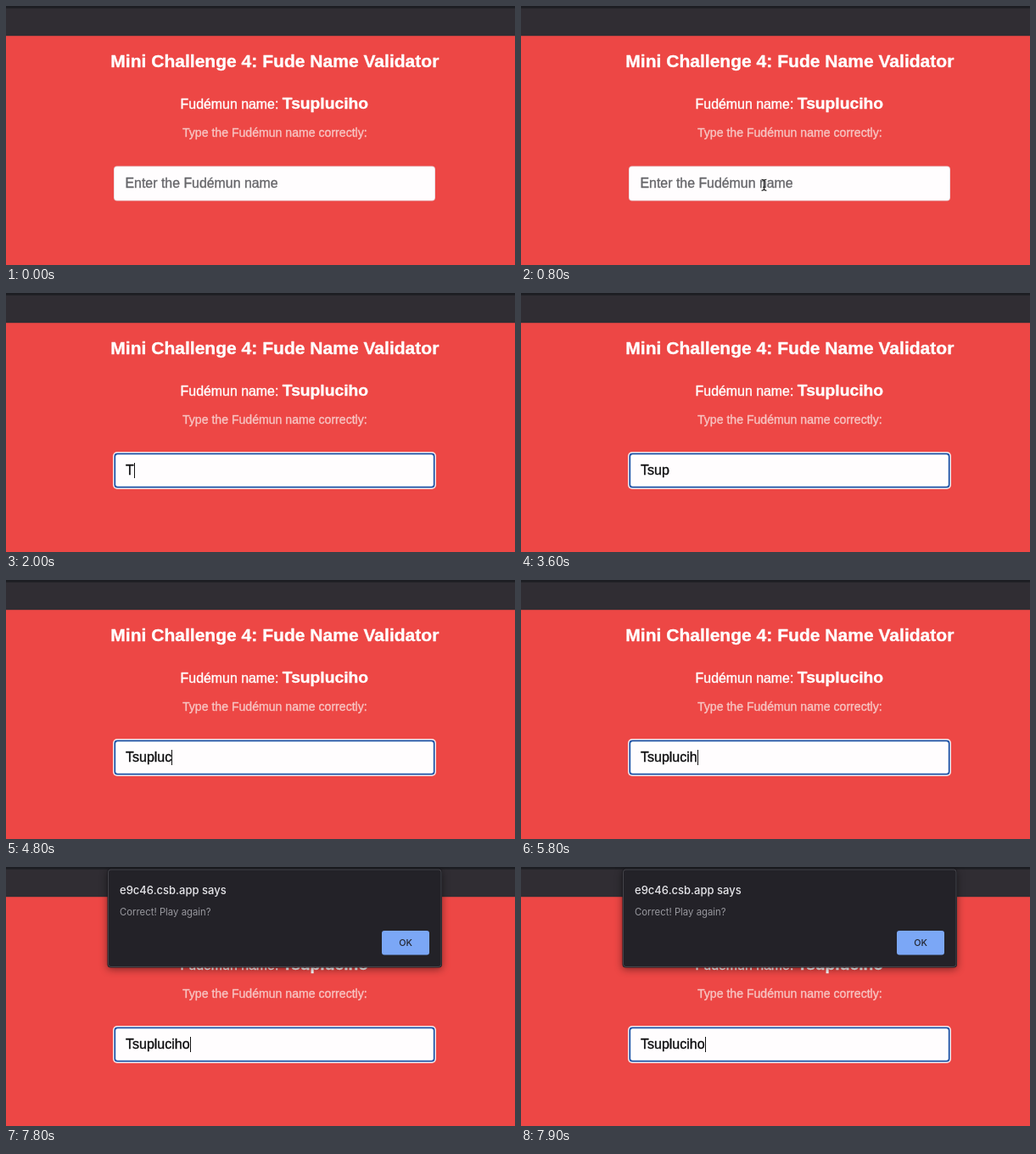
Animation, 600 px wide and 305 px high, one loop 8 s. Source, as an HTML page with a canvas:

```html
<!DOCTYPE html>
<html lang="en">
<head>
<meta charset="utf-8">
<title>Name Validator</title>
<style>
  html, body { margin: 0; width: 100%; height: 100%; overflow: hidden; background: #ed4745; }
  canvas { display: block; width: 600px; height: 305px; }
</style>
</head>
<body>
<canvas id="stage" width="600" height="305"></canvas>
<script>
const ctx = document.getElementById('stage').getContext('2d');
const LOOP = 8000;
const BRAND = 'Fudémun';
const NAME = 'Tsupluciho';
const SANS = '"Liberation Sans", Arial, sans-serif';
const UI = 'Inter, sans-serif';

const FOCUS = 1200;
const ALERT = 7800;
const KEYS = [1900, 2200, 2600, 3100, 3700, 3900, 4800, 5000, 5800, 6500];
// Pointer stops: time, x, y
const PATH = [[100, 372, 254], [300, 304, 214], [500, 290, 211], [700, 288, 211], [1100, 282, 210]];

function text(str, x, y, font, color, align = 'left') {
  ctx.font = font;
  ctx.fillStyle = color;
  ctx.textAlign = align;
  ctx.fillText(str, x, y);
}

// Text with slightly heavier strokes, as in smoothed page type
function pageText(str, x, y, font, color, align) {
  text(str, x, y, font, color, align);
  ctx.strokeStyle = color;
  ctx.lineWidth = 0.35;
  ctx.lineJoin = 'round';
  ctx.strokeText(str, x, y);
}

function box(x, y, w, h, r, fill) {
  ctx.beginPath();
  ctx.roundRect(x, y, w, h, r);
  ctx.fillStyle = fill;
  ctx.fill();
}

function drawPage() {
  ctx.fillStyle = '#ed4745';
  ctx.fillRect(0, 0, 600, 305);
  ctx.fillStyle = '#302d33';
  ctx.fillRect(0, 0, 600, 35.2);
  ctx.fillStyle = '#1c1d22';
  ctx.fillRect(0, 0, 600, 2.6);

  pageText('Mini Challenge 4: Fude Name Validator', 316.8, 72, `bold 21.05px ${SANS}`, '#fff', 'center');
  pageText(`${BRAND} name:`, 205.6, 121, `15.9px ${SANS}`, '#fff');
  pageText(NAME, 325.8, 121, `bold 19.25px ${SANS}`, '#fff');
  pageText(`Type the ${BRAND} name correctly:`, 316.8, 153.5, `14.1px ${SANS}`, '#f7c5c3', 'center');
}

function drawInput(t) {
  const focused = t >= FOCUS;
  if (focused) {
    box(126, 187, 381, 44, 5, '#fbe9ea');
    box(127.4, 188.4, 378.2, 41.2, 4, '#1d55a8');
    box(129.2, 190.2, 374.6, 37.6, 2.5, '#fffdfe');
  } else {
    box(127, 188.5, 379, 41, 4, '#e6d3d8');
    box(127.8, 189.3, 377.4, 39.4, 3.5, '#fffdfe');
  }

  const count = KEYS.filter(k => t >= k).length;
  const typed = NAME.slice(0, count);
  const font = `16px ${SANS}`;
  if (count) pageText(typed, 141, 214, font, '#0c0c0e');
  else pageText(`Enter the ${BRAND} name`, 140.5, 214, `15.9px ${SANS}`, '#66666a');

  const last = count ? KEYS[count - 1] : FOCUS;
  if (focused && (t - last) % 1000 < 500) {
    ctx.font = font;
    const x = Math.round(141 + ctx.measureText(typed).width);
    ctx.fillStyle = '#111';
    ctx.fillRect(x, 200, 1, 18);
  }
}

function pointerAt(t) {
  const i = PATH.findIndex(p => p[0] > t);
  if (i < 0) return PATH[PATH.length - 1].slice(1);
  const [t0, x0, y0] = PATH[i - 1];
  const [t1, x1, y1] = PATH[i];
  const k = (t - t0) / (t1 - t0);
  return [x0 + (x1 - x0) * k, y0 + (y1 - y0) * k];
}

function drawPointer(t) {
  if (t < PATH[0][0] || t >= KEYS[0]) return;
  const [x, y] = pointerAt(t);
  ctx.save();
  ctx.translate(x, y);
  if (y < 230) {
    ctx.strokeStyle = '#222';
    ctx.lineWidth = 1.2;
    ctx.stroke(new Path2D('M-3-6.5Q0-6.5 0-4.5Q0-6.5 3-6.5M0-4.5V4.5M-3 6.5Q0 6.5 0 4.5Q0 6.5 3 6.5M-1.5 2.5H1.5'));
  } else {
    const arrow = new Path2D('M0 0V14L3.3 11L5.5 16L7.7 15L5.5 10.2H10Z');
    ctx.fillStyle = '#111';
    ctx.fill(arrow);
    ctx.strokeStyle = '#fff';
    ctx.lineWidth = 1;
    ctx.stroke(arrow);
  }
  ctx.restore();
}

function drawAlert() {
  ctx.save();
  ctx.shadowColor = 'rgba(0,0,0,.45)';
  ctx.shadowBlur = 10;
  ctx.shadowOffsetY = 2;
  box(119.5, 2, 394.5, 116.5, 4, '#15151a');
  ctx.restore();
  box(120, 2.5, 393.5, 115.5, 4, '#45444a');
  box(121, 3.5, 391.5, 113.5, 3, '#232228');

  text('e9c46.csb.app says', 134, 31.5, `500 13px ${UI}`, '#e6e6ea');
  text('Correct! Play again?', 134, 57, `11.35px ${UI}`, '#98989e');
  box(443, 75, 56, 28.5, 3, '#7ba7f6');
  text('OK', 471, 93, `500 10.8px ${UI}`, '#23262f', 'center');
}

function frame() {
  const t = performance.now() % LOOP;
  drawPage();
  drawInput(t);
  drawPointer(t);
  if (t >= ALERT) drawAlert();
  requestAnimationFrame(frame);
}
frame();
</script>
</body>
</html>
```
